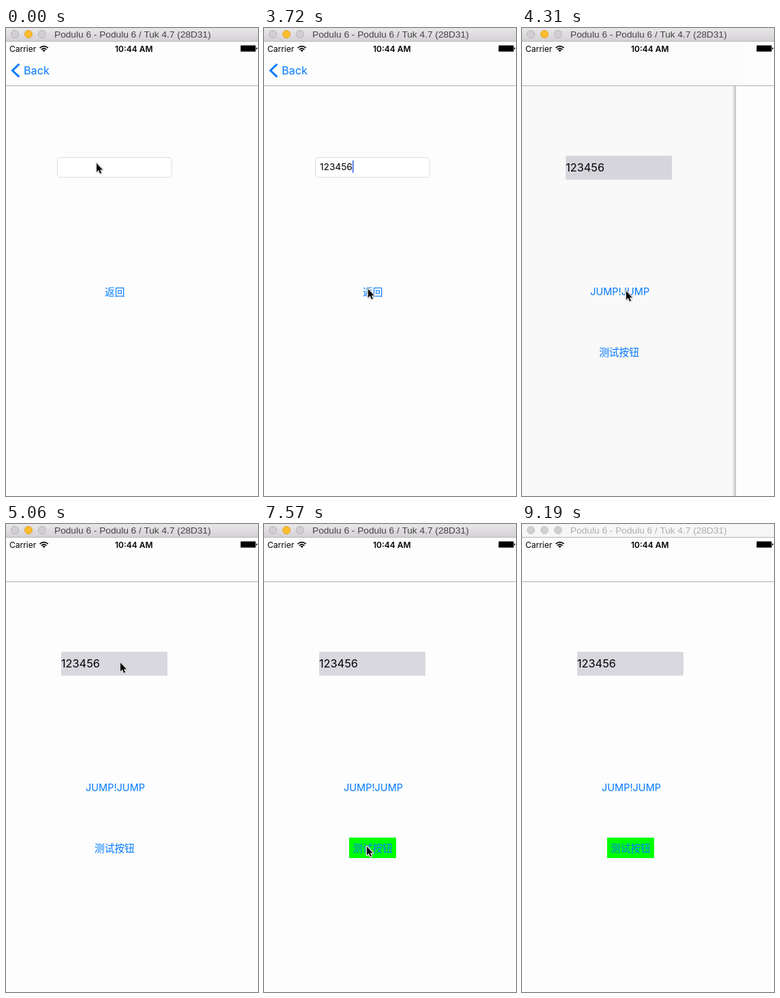
These frames come from a looping animation (370x685 px, 9230 ms). An HTML page:

```html
<!DOCTYPE html>
<html lang="zh">
<head>
<meta charset="utf-8">
<style>
  html, body { margin: 0; width: 100%; height: 100%; overflow: hidden; background: #fdfdfd; }
  svg { display: block; width: 100%; height: 100%; }
  text { font-family: Inter, "Noto Sans CJK SC", "Noto Sans CJK", sans-serif; white-space: pre; }
  .blue { fill: #007aff; }
  .cjk { font: 14.7px "Noto Sans CJK SC", "Noto Sans CJK", sans-serif; }
  #title { font: 13.7px "Liberation Sans", sans-serif; fill: #454345; }
  #lights circle { fill: #d1cfd1; stroke: #b4b2b4; }
  #lights .amber { fill: #fdbd2e; stroke: #e0a32a; }
  .idle #bar { fill: #f6f6f6; }
  .idle #title { fill: #aeaeae; }
  .idle #lights circle { fill: #d0d0d0; stroke: #c8c8c8; }
</style>
</head>
<body>
<svg viewBox="0 0 370 685">
  <defs>
    <linearGradient id="chrome" x2="0" y2="1">
      <stop stop-color="#e9e7e9"/><stop offset="1" stop-color="#d2d0d2"/>
    </linearGradient>
    <linearGradient id="shade">
      <stop stop-opacity="0"/><stop offset="1" stop-opacity=".25"/>
    </linearGradient>
  </defs>

  <g id="home">
    <rect width="490" height="685" fill="#fdfdfd"/>
    <rect x="81" y="187" width="156" height="35" fill="#d9d8df"/>
    <text x="81" y="210" font-size="16.3">123456</text>
    <text class="blue" x="117" y="391" font-size="14.5">JUMP!JUMP</text>
    <rect id="green" x="125" y="459" width="69" height="30" fill="#0f0"/>
    <text id="test" class="blue cjk" x="130" y="479.5">测试按钮</text>
  </g>
  <rect id="dim" width="370" height="685"/>

  <g id="page">
    <rect x="-6" width="6" height="685" fill="url(#shade)"/>
    <rect width="370" height="685" fill="#fdfdfd"/>
    <rect x="75.5" y="189.5" width="168" height="29" rx="4.5" fill="#fff" stroke="#dcdcdc"/>
    <text id="field" x="82" y="208" font-size="13.7"></text>
    <rect id="caret" y="194" width="1.7" height="18" fill="#426bf2"/>
    <text id="return" class="blue cjk" x="145" y="391.5">返回</text>
  </g>

  <rect y="20" width="370" height="64" fill="#fdfdfd"/>
  <rect id="tint" y="20" height="64"/>
  <rect y="84" width="370" height="1" fill="#b2b2b2"/>
  <g id="back">
    <path d="M19.3 52.8 9.5 62.2l9.8 9.4" fill="none" stroke="#007aff" stroke-width="2.9"/>
    <text id="backText" class="blue" x="26" y="68" font-size="16.2">Back</text>
  </g>

  <text x="5" y="34.5" font-size="12">Carrier</text>
  <text x="160" y="34.5" font-size="12" font-weight="600">10:44 AM</text>
  <g fill="none" stroke="#000" stroke-width="1.7">
    <path d="M49.6 29.2q6-5.2 12 0M51.8 31.6q3.8-3.4 7.6 0"/>
    <path d="M53.3 32.5q2.3-1.6 4.6 0l-2.3 2.4z" fill="#000" stroke="none"/>
  </g>
  <rect x="344" y="25" width="23" height="10" rx="1.5" fill="#777"/>
  <rect x="345" y="26" width="21" height="8" rx=".6"/>
  <rect x="367.3" y="28.5" width="1.4" height="3" rx=".7"/>

  <g id="window">
    <rect id="bar" width="370" height="20" fill="url(#chrome)"/>
    <rect y="19" width="370" height="1" fill="#b9b7b9"/>
    <g id="lights">
      <circle cx="13" cy="9" r="5.5"/><circle class="amber" cx="33" cy="9" r="5.5"/><circle cx="53" cy="9" r="5.5"/>
    </g>
    <text id="title" x="71" y="14">Podulu 6 - Podulu 6 / Tuk 4.7 (28D31)</text>
  </g>

  <g id="cursor" stroke-linejoin="round">
    <path id="arrow" d="M0 0v12.8l2.9-2.7 2.2 4.9 2-.9-2.2-4.7h4z" stroke="#bbb" stroke-width="2.6"/>
    <use href="#arrow" style="stroke:#fff"/>
    <path d="M0 0v12.8l2.9-2.7 2.2 4.9 2-.9-2.2-4.7h4z" stroke="#fff" stroke-width="1.5" paint-order="stroke"/>
  </g>
</svg>
<script>
const LOOP = 9230;
const STEP = 148.4;
const PRESSES = [6080, 7710];
const KEYS = [1340, 1630, 1930, 2380, 2380, 2680];
const MOVES = [ // start, end, x, y
  [0, 290, 144, 205], [3120, 3720, 153, 385], [4310, 4760, 168, 203],
  [5060, 5940, 165, 467], [6380, 6980, 186, 474], [6980, 7420, 151, 472],
  [7860, 8890, 346, 690]
];

const $ = id => document.getElementById(id);
const set = (id, attrs) => {
  for (const k in attrs) $(id).setAttribute(k, attrs[k]);
};
const clamp = v => Math.max(0, Math.min(1, v));

function pointer(s) {
  let x = 133, y = 198;
  for (const [a, b, toX, toY] of MOVES) {
    const f = clamp((s - a) / (b - a));
    x += (toX - x) * f;
    y += (toY - y) * f;
  }
  return `translate(${x} ${y})`;
}

// Critically damped spring
function slide(s) {
  const u = Math.max(0, s - 4100) * .01655;
  const p = 1 - (1 + u) * Math.exp(-u);
  return p > .99 ? 1 : p;
}

// A pressed label dims, then recovers
function label(s) {
  const last = PRESSES.filter(k => k <= s).pop();
  return last ? .32 + .68 * clamp((s - last) / 300) : 1;
}

function draw(now) {
  const t = now % LOOP;
  const s = Math.floor((t + 5) / STEP) * STEP;
  const p = slide(s);

  set('home', { transform: `translate(${-112 * (1 - p)})` });
  set('dim', { opacity: .1 * (1 - p) });
  set('page', { transform: `translate(${370 * p})`, visibility: p < 1 ? 'visible' : 'hidden' });
  set('tint', { width: p ? 370 * p + 14 : 0, opacity: .045 * (1 - p) });
  set('back', { opacity: clamp(1 - 1.9 * p) });
  set('backText', { x: 26 + 87 * p });

  const typed = KEYS.filter(k => k <= t).length;
  $('field').textContent = '123456'.slice(0, typed);
  set('caret', {
    x: 82 + (typed && $('field').getComputedTextLength()),
    opacity: t >= 890 && s < 4000 ? 1 : 0
  });
  set('return', { opacity: s >= 3850 ? .3 : 1 });

  set('green', { opacity: s >= PRESSES[0] ? 1 : 0 });
  set('test', { opacity: label(s) });
  set('cursor', { transform: pointer(s) });
  set('window', { class: t >= 9190 ? 'idle' : '' });
}

let start;
function loop(now) {
  start ??= now;
  draw(now - start);
  requestAnimationFrame(loop);
}
draw(0);
requestAnimationFrame(loop);
</script>
</body>
</html>
```
